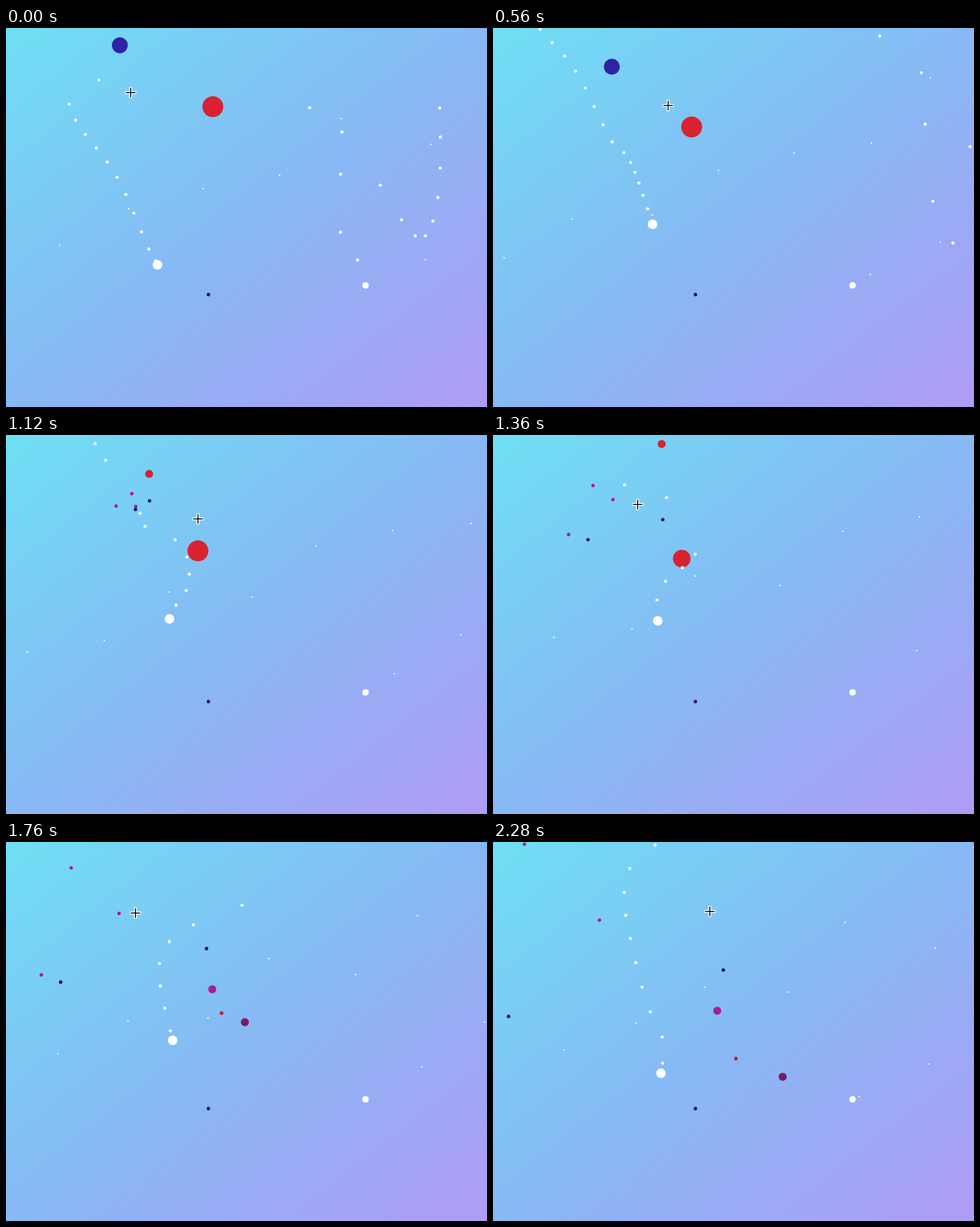
An HTML page with a canvas that plays this animation: 600 by 472 pixels, repeating every 2320 ms.

```html
<!DOCTYPE html>
<html lang="en">
<head>
<meta charset="utf-8">
<title>Dot shooter</title>
<style>
html, body { margin: 0; width: 100%; height: 100%; overflow: hidden; }
body { background: linear-gradient(to bottom right, #6fdff4, #87b9f4 50%, #b09bf5); }
canvas { display: block; }
</style>
</head>
<body>
<canvas id="stage" width="600" height="472"></canvas>
<script>
const ctx = document.getElementById('stage').getContext('2d');
const LOOP = 2320, STEP = 40, FRICTION = .0042;
const WHITE = '#fff', RED = '#d8222f', BLUE = '#2f22a5', NAVY = '#1b0d57',
      MAGENTA = '#ad1b90', PLUM = '#7b1a60', BRICK = '#b8283f';

// Milliseconds against game time, counted in pixels of bullet travel; it lags during explosions.
const clock = [[0, 0], [320, 77], [800, 196.7], [1120, 249.7], [1360, 302.4], [1760, 384], [2280, 504]];

// The paths begin before the loop, so shots already in flight come from the same rule.
const shipPath = [[-540, 17, 345], [-297, 132, 338], [-250, 147, 335], [-130, 172, 311], [-33, 185.5, 308],
  [0, 189, 295], [77, 195.5, 261], [197, 202, 232], [250, 204, 229], [302, 205.5, 231.5],
  [384, 208, 247], [504, 209.5, 288]];
const cursorPath = [[-2494, 265, 230], [-2034, 334, 292], [-1787, 361, 258], [-1536, 328, 143],
  [-1436, 380, 201], [-1336, 419, 292], [-1236, 420, 253], [-1137, 118, 80], [-1037, 76, 85],
  [-540, 110, 80], [-139, 135, 80], [0, 155, 80], [320, 163, 73], [460, 168, 78], [560, 218, 96],
  [800, 268, 108], [930, 277, 109], [1120, 239, 104], [1360, 180, 86], [1760, 161, 88],
  [2030, 168, 87], [2135, 220, 86], [2280, 270, 86]];

// Converts between the two columns of the clock.
function convert(v, from, to) {
  let i = 1;
  while (i < clock.length - 1 && v > clock[i][from]) i++;
  const a = clock[i - 1], b = clock[i];
  return a[to] + (b[to] - a[to]) * (v - a[from]) / (b[from] - a[from]);
}

// Smooth curve through [time, x, y] points, straight beyond the ends.
function along(path, t) {
  const last = path.length - 1;
  const slope = (i, c) => {
    const a = path[Math.max(i - 1, 0)], b = path[Math.min(i + 1, last)];
    return (b[c] - a[c]) / (b[0] - a[0]);
  };
  let i = 0;
  while (i < last - 1 && t > path[i + 1][0]) i++;
  const p = path[i], q = path[i + 1], h = q[0] - p[0], u = (t - p[0]) / h, v = 1 - u;
  return [1, 2].map(c => {
    if (u < 0) return p[c] + slope(i, c) * u * h;
    if (u > 1) return q[c] - slope(i + 1, c) * v * h;
    return v * v * ((1 + 2 * u) * p[c] + u * h * slope(i, c)) +
           u * u * ((3 - 2 * u) * q[c] - v * h * slope(i + 1, c));
  });
}

const blue = { x: 142, y: 21.5, vx: .0455, vy: .1955, r: 10, reach: 16, bursts: 225 };
const red = { x: 258, y: 98, vx: -.0745, vy: .185, r: 13, reach: 11, bursts: 305 };
const at = (o, g) => [o.x + o.vx * g, o.y + o.vy * g];

const bullets = [], fragments = [];

function shoot(born, x, y, dx, dy, r) {
  const len = Math.hypot(dx, dy), vx = dx / len, vy = dy / len;
  const bullet = { born, x: x - vx * born, y: y - vy * born, vx, vy, r, dies: Infinity };
  bullets.push(bullet);
  return bullet;
}

// Targets, and for a while their debris, swallow bullets.
function hits(bullet, target, g) {
  const [x, y] = at(bullet, g), [tx, ty] = at(target, g);
  return g < target.bursts + 40 && Math.hypot(x - tx, y - ty) < target.reach;
}

// The ship aims at the cursor.
for (let born = -609.5; born < 520; born += 24) {
  const [x, y] = along(shipPath, born);
  const [cx, cy] = along(cursorPath, convert(born, 1, 0));
  const bullet = shoot(born, x, y, cx - x, cy - y, 2);
  for (let g = Math.max(0, born); g < 520 && bullet.dies > g; g++)
    if (hits(bullet, blue, g) || hits(bullet, red, g)) bullet.dies = g;
}

// Two turrets fire small shots with a swaying aim.
for (let i = 0; i < 12; i++) {
  shoot(96 * i - 652.5, -99, 318, 1, .065 * Math.cos(2.63 * i) - .34, 1);
  shoot(96 * i - 81, 448.5, 320.5, 1, .11 * Math.cos(1.1 * i) - .54, 1);
}

function burst(born, x, y, ...parts) {
  for (const [dx, dy, r, color] of parts) fragments.push({ born, x, y, dx, dy, r, color });
}
burst(blue.bursts, 161, 69,
  [183, 131, 2.2, NAVY], [-41, 41, 2.2, MAGENTA], [-240, 198, 2.2, MAGENTA], [178, -208, 5, RED]);
burst(247, 164, 90.5, [-219, 192, 2.2, NAVY], [-189, -133, 2.2, MAGENTA]);
burst(red.bursts, 235, 157, [79, 94, 5, MAGENTA], [223, 239, 5, PLUM], [120, 199, 2.4, BRICK]);

function dot(x, y, r, color) {
  ctx.fillStyle = color;
  ctx.beginPath();
  ctx.arc(x, y, r, 0, 7);
  ctx.fill();
}

function plus(x, y, size, width, color) {
  ctx.fillStyle = color;
  ctx.fillRect(x - size / 2, y - width / 2, size, width);
  ctx.fillRect(x - width / 2, y - size / 2, width, size);
}

function draw(t) {
  const g = convert(t, 0, 1);
  ctx.clearRect(0, 0, 600, 472);

  dot(252.5, 332, 2.2, NAVY);
  dot(448.5, 320.5, 4, WHITE);
  if (g < blue.bursts) dot(...at(blue, g), blue.r, BLUE);
  if (g < red.bursts) dot(...at(red, g), g < 258 ? red.r : red.reach, RED);

  for (const f of fragments) {
    const s = 1 - Math.exp(-FRICTION * (g - f.born));
    if (s >= 0) dot(f.x + f.dx * s, f.y + f.dy * s, f.r, f.color);
  }
  for (const b of bullets)
    if (g >= b.born && g < b.dies) dot(...at(b, g), b.r, WHITE);
  dot(...along(shipPath, g), 6, WHITE);

  const [x, y] = along(cursorPath, t).map(v => Math.round(v) + .5);
  plus(x, y, 14, 3.6, WHITE);
  plus(x, y, 12, 1.2, '#000');
}

function frame(now) {
  draw(Math.floor(now % LOOP / STEP) * STEP);
  requestAnimationFrame(frame);
}
requestAnimationFrame(frame);
</script>
</body>
</html>
```
